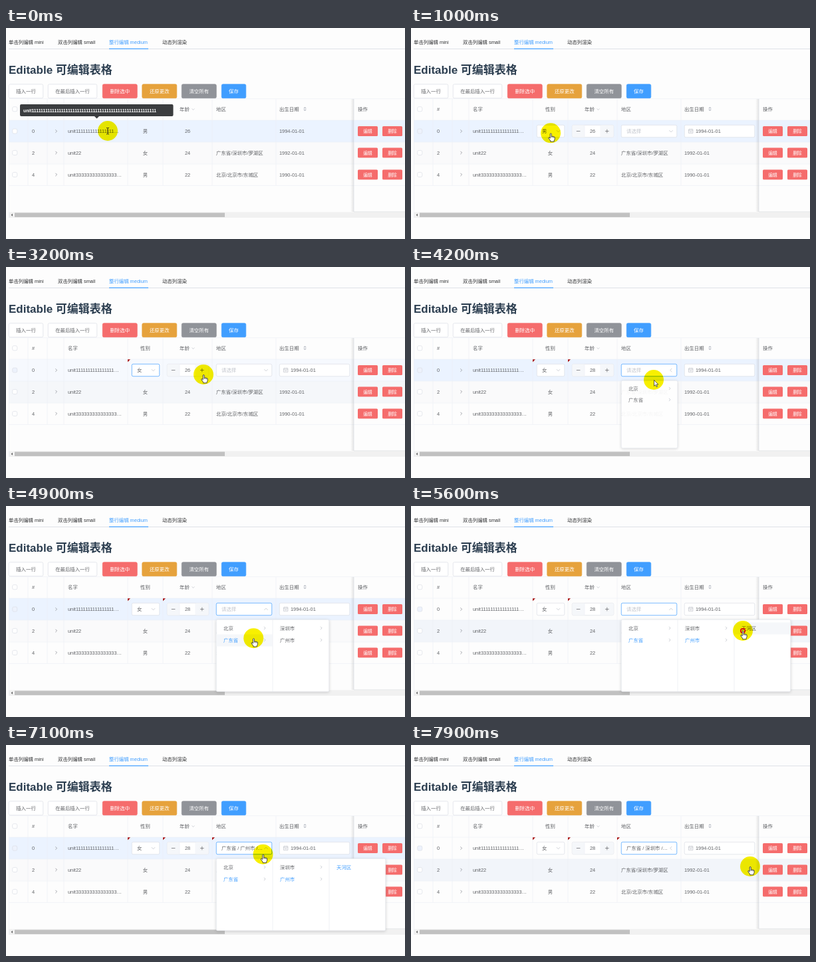
Animation of 600x318 px, one loop 8 s. Source, as an HTML page:

```html
<!DOCTYPE html>
<html lang="zh">
<head>
<meta charset="utf-8">
<title>Editable table</title>
<style>
html, body { margin: 0; width: 100%; height: 100%; overflow: hidden; background: #fdfdfd; }
svg { display: block; width: 600px; height: 318px; font: 7.4px "Liberation Sans", "Noto Sans CJK SC", "Noto Sans CJK", sans-serif; }
text { white-space: pre; }
.panel { filter: drop-shadow(0 1px 2px rgba(0, 0, 0, .16)); }
.spot { mix-blend-mode: multiply; }
</style>
</head>
<body>
<svg viewBox="0 0 600 318">
  <defs>
    <linearGradient id="edge"><stop stop-opacity="0"/><stop offset="1" stop-opacity=".1"/></linearGradient>
  </defs>
  <g id="page"></g><g id="live"></g>
</svg>
<script>
const LOOP = 8000, STEP = 100;
const BLUE = '#409eff', RED = '#f56c6c', INK = '#606266', DARK = '#303133',
      LINE = '#ebeef5', BORDER = '#dcdfe6', MUTED = '#c0c4cc', PAPER = '#fdfdfd';
const rowTops = [139, 172, 205, 237.5];
const rowMid = [155.5, 188, 221];
const longName = n => 'unit' + '1'.repeat(n);

// time, x, y, pointer shape
const pointerPath = [
  [0, 153, 155, 'beam'], [100, 168, 156, 'arrow'], [300, 208, 157, 'arrow'],
  [500, 208, 157, 'hand'], [1300, 211, 159, 'hand'], [1700, 211, 159, 'hand'],
  [2000, 215, 174, 'hand'], [2200, 213, 190, 'hand'], [2500, 212, 198, 'hand'],
  [2800, 214, 198, 'arrow'], [3200, 297, 162, 'hand'], [3700, 295, 158, 'hand'],
  [4000, 360, 160, 'hand'], [4200, 365, 170, 'arrow'], [4600, 350, 198, 'hand'],
  [4800, 352, 199, 'hand'], [5100, 430, 200, 'hand'], [5300, 432, 199, 'hand'],
  [5500, 499, 188, 'hand'], [5800, 499, 188, 'arrow'], [6300, 453, 160, 'beam'],
  [6500, 453, 160, 'beam'], [6800, 372, 157, 'hand'], [7000, 372, 158, 'hand'],
  [7300, 428, 184, 'hand'], [7400, 430, 184, 'hand'], [7700, 508, 184, 'hand'],
  [7900, 510, 183, 'hand']
];
const clicks = [500, 1400, 2500, 3400, 3700, 4000, 4700, 5100, 5600, 6800, 7300, 7700];
const rowHover = [[-1000, 0], [2700, 1], [3100, 0], [5100, 1], [5900, 0], [7600, 1]];

const clamp = v => Math.max(0, Math.min(1, v));
const rect = (x, y, w, h, fill, extra = '') =>
  `<rect x="${x}" y="${y}" width="${w}" height="${h}" fill="${fill}" ${extra}/>`;
const box = (x, y, w, h, stroke = BORDER, fill = '#fff') =>
  rect(x + .25, y + .25, w - .5, h - .5, fill, `rx="2" stroke="${stroke}" stroke-width=".7"`);
const text = (x, mid, str, fill = INK, extra = '') =>
  `<text x="${x}" y="${mid + 2.7}" fill="${fill}" ${extra}>${str}</text>`;
const centered = (x, mid, str, fill, extra = '') => text(x, mid, str, fill, 'text-anchor="middle" ' + extra);
const path = (d, stroke, width = .7, fill = 'none', extra = '') =>
  `<path d="${d}" stroke="${stroke}" stroke-width="${width}" fill="${fill}" ${extra}/>`;
const chevron = (x, y, turn = 0, size = 2.6, color = MUTED) =>
  path(`M${-size} ${-size / 2}L0 ${size / 2}L${size} ${-size / 2}`, color, .8, 'none',
    `transform="translate(${x} ${y}) rotate(${turn})"`);
const vLine = (x, y1, y2) => rect(x - .3, y1, .6, y2 - y1, LINE);
const hLine = y => rect(4, y - .3, 596, .6, LINE);

function mix(a, b, k) {
  return `rgb(${a.map((v, i) => Math.round(v + (b[i] - v) * k))})`;
}

function button(x, w, label, fill) {
  return box(x, 84.5, w, 21.5, fill || BORDER, fill || '#fff') +
    centered(x + w / 2, 95.5, label, fill ? '#fff' : INK);
}

function drawPage() {
  const tabs = [[4, '单击列编辑 mini'], [78, '双击列编辑 small'], [155, '整行编辑 medium'], [235, '动态列渲染']];
  const heads = [[39, '#'], [93, '名字'], [202, '性别'], [261, '年龄'], [316, '地区'], [411, '出生日期'], [529, '操作']];
  return rect(0, 0, 600, 318, PAPER) +
    tabs.map(([x, s], i) => text(x, 21.5, s, i === 2 ? BLUE : DARK)).join('') +
    rect(4, 31, 596, 1, '#dfe2e8') + rect(155, 30.8, 59, 1.2, BLUE) +
    `<text x="4" y="69" font-size="17" font-weight="700" fill="#2c3e50">Editable 可编辑表格</text>` +
    button(4, 52, '插入一行') + button(63, 74, '在最后插入一行') +
    button(145, 52.5, '删除选中', RED) + button(204.5, 52.5, '还原更改', '#e6a23c') +
    button(264, 52.5, '清空所有', '#909399') + button(324, 37, '保存', BLUE) +
    heads.map(([x, s]) => text(x, 122, s)).join('') +
    chevron(281.5, 122.5, 0, 1.9) +
    path('M447 121.3l2.5-2.6 2.5 2.6zM447 122.7l2.5 2.6 2.5-2.6z', 'none', 0, MUTED) +
    box(9.5, 118.5, 7.5, 7.5) +
    rect(4, 277.5, 596, 8.5, '#f1f1f1') + rect(13, 278.5, 316, 6.5, '#c1c1c1') +
    path('M10 279.7v4l-2.4-2z', 'none', 0, '#666');
}

function pointerAt(t) {
  let i = 0;
  while (i < pointerPath.length - 1 && pointerPath[i + 1][0] <= t) i++;
  const a = pointerPath[i], b = pointerPath[i + 1] || a;
  const k = clamp((t - a[0]) / (b[0] - a[0] || 1)), e = k * k * (3 - 2 * k);
  return { x: a[1] + (b[1] - a[1]) * e, y: a[2] + (b[2] - a[2]) * e, shape: a[3] };
}

function hoverWeight(row, t) {
  const i = rowHover.findLastIndex(h => h[0] <= t);
  const k = clamp((t - rowHover[i][0]) / 250);
  if (rowHover[i][1] === row) return k;
  return i && rowHover[i - 1][1] === row ? 1 - k : 0;
}

// Opening and closing of a popup: panel visibility and arrow angle
function popup(t, open, close) {
  const k = clamp((t - open) / 300);
  return {
    show: t >= close ? 1 - clamp((t - close) / 150) : 1 - (1 - k) ** 4,
    turn: 180 * (t >= close ? 1 - clamp((t - close) / 300) : k)
  };
}

function grow(state, top, content) {
  if (!state.show) return '';
  return `<g class="panel" opacity="${state.show}" transform="translate(0 ${top * (1 - state.show)}) scale(1 ${state.show})">${content}</g>`;
}

function drawRows(t) {
  const base = [[253, 253, 253], [250, 250, 251], [253, 253, 253]];
  const over = [[235, 243, 255], [242, 245, 250], [245, 247, 250]];
  const cells = [
    ['0', longName(16) + '…', '男', '26', '', '1994-01-01'],
    ['2', 'unit22', '女', '24', '广东省/深圳市/罗湖区', '1992-01-01'],
    ['4', 'unit' + '3'.repeat(15) + '…', '男', '22', '北京/北京市/东城区', '1990-01-01']
  ];
  const editing = t >= 500;
  let out = '';
  cells.forEach(([id, name, sex, age, area, date], i) => {
    const y = rowMid[i], top = rowTops[i];
    out += rect(4, top, 596, rowTops[i + 1] - top, mix(base[i], over[i], hoverWeight(i, t)));
    out += box(9.5, y - 3.7, 7.5, 7.5, BORDER, i || !editing ? '#fff' : '#edf2fc');
    out += text(39, y, id) + chevron(75.5, y, -90, 2.2, '#8c8f96') + text(93, y, name);
    if (i || !editing) {
      out += centered(209.5, y, sex) + centered(273, y, age) + text(316, y, area) + text(411, y, date);
    }
    for (const [x, label] of [[529, '编辑'], [566, '删除']])
      out += rect(x, y - 7.5, 30, 15, RED, 'rx="1.6"') + centered(x + 15, y - .2, label, '#fff', 'font-size="6.8" font-weight="500"');
  });
  return out + [106.8, ...rowTops].map(hLine).join('') +
    [4.3, 33, 62, 87, 183, 236, 310, 406].map(x => vLine(x, 107, x < 5 ? 286 : 237)).join('') +
    rect(518, 107, 5, 170, 'url(#edge)') + rect(522.7, 107, .7, 170, '#dfe2e8') +
    rect(523, 276.5, 77, 1, '#e2e3e6');
}

function drawEditors(t, p, sexList, areaList) {
  if (t < 500) return '';
  const y = rowMid[0], top = 146, h = 19;
  const age = 26 + (t >= 3400) + (t >= 3700);
  const area = t >= 7700 ? '广东省 / 深圳市 /…' : t >= 5700 ? '广东省 / 广州市 /…' : '';
  const overDate = p.x > 411 && p.x < 517 && p.y > top && p.y < top + h;
  const marks = [[183, 2600], [236, 3400], [310, 5700]].filter(m => t >= m[1]);
  return box(189, top, 42, h, t >= 1400 && t < 4100 ? BLUE : BORDER) +
    text(197, y, t >= 2600 ? '女' : '男') + chevron(221.5, y, sexList.turn) +
    box(242, top, 63, h) + rect(242.5, 146.5, 18.5, 18, '#f5f7fa') + rect(285.5, 146.5, 19, 18, '#f5f7fa') +
    vLine(261, 146.5, 164.5) + vLine(285, 146.5, 164.5) +
    path('M248.8 155.5h5.6M292 155.5h5.6M294.8 152.7v5.6', INK) + centered(273, y, age) +
    box(316, top, 84, h, t >= 4100 ? BLUE : BORDER) +
    text(324, y, area || '请选择', area ? INK : MUTED) + chevron(391, y, areaList.turn) +
    box(411, top, 106, h) +
    path('M417.5 152.8h6.4v5.6h-6.4zM417.5 154.7h6.4M419.2 151.8v1.6M422.2 151.8v1.6M419 156.5h3.4', '#b4b8c0', .6) +
    text(428, y, '1994-01-01') +
    (overDate ? `<circle cx="507.5" cy="155.3" r="3.2" fill="#a9adb5"/>` + path('M506.4 154.2l2.2 2.2m0-2.2l-2.2 2.2', '#fff', .6) : '') +
    marks.map(([x]) => path(`M${x} 139.3h4l-4 4z`, 'none', 0, '#a80f0f')).join('');
}

function drawSexList(state, p) {
  const items = ['男', '女'].map((s, i) => {
    const y = 174 + 18 * i, hot = p.y > 172 + 18 * i && p.y < 190 + 18 * i;
    return (hot ? rect(189.5, y, 41, 18, '#f5f7fa') : '') + text(200, y + 9, s, i ? INK : BLUE, i ? '' : 'font-weight="700"');
  });
  return grow(state, 167, box(189, 167, 41.5, 47, '#e4e7ed') + items.join(''));
}

function drawAreaList(t, state, p) {
  const again = t >= 6700;
  const city = again ? (t >= 7300 ? '深圳市' : '广州市') : t >= 5100 ? '广州市' : '';
  const columns = [['北京', '广东省']];
  if (again || t >= 4700) columns.push(['深圳市', '广州市']);
  if (city) columns.push([city === '深圳市' ? '罗湖区' : '天河区']);
  const chosen = [again || t >= 4700 ? '广东省' : '', city, again && t < 7300 || t >= 7700 ? columns[2][0] : ''];
  let out = box(316, 171, 85 * columns.length, 109, '#e4e7ed');
  columns.forEach((items, c) => {
    const x = 316 + 85 * c;
    if (c) out += rect(x - .3, 171, .6, 109, '#e4e7ed');
    items.forEach((name, i) => {
      const y = 175.5 + 18 * i;
      const hot = p.x > x && p.x < x + 85 && p.y > y && p.y < y + 18;
      const color = chosen[c] === name ? BLUE : INK;
      if (hot) out += rect(x + .4, y, 84.2, 18, '#f5f7fa');
      out += text(x + 11, y + 8.7, name, color) + (c < 2 ? chevron(x + 73, y + 8.5, -90, 2.2) : '');
    });
  });
  return grow(state, 170, out);
}

function drawTooltip(t) {
  const alpha = 1 - clamp(t / 300);
  return alpha ? `<g opacity="${alpha}">` + rect(21, 115, 230.5, 18, '#3b3d3f', 'rx="2"') +
    path('M133 133h7l-3.5 3.5z', 'none', 0, '#3b3d3f') +
    text(26, 124, longName(55), '#fff', 'font-size="6.8" font-weight="700"') + '</g>' : '';
}

function drawPointer(t, { x, y, shape }) {
  const shapes = {
    beam: path('M-2 -4.5h1.4l.6 .6 .6-.6H2M0 -4v8.5M-2 5h1.4L0 4.4l.6 .6H2', '#222', .9),
    arrow: path('M.5 .5v9l2.1-2 1.5 3.3 1.4-.6-1.5-3.2h2.9z', '#222', .7, '#fff'),
    hand: path('M-.8 1q1-1.2 2 0v4.2l1.6-.3 1.7 .4 1.6 .8v3.3l-1 2v1.4H-.3v-1.2l-2.8-3.8q-.5-1.5 1-1.2l1.3 1.2z', '#222', .8, '#fff') +
      path('M1.2 5v2M3 5.3v1.8M4.6 5.8v1.5', '#222', .6)
  };
  const pressed = clicks.some(c => t >= c && t - c < 200);
  return `<circle class="spot" cx="${x}" cy="${y}" r="15" fill="#f8f000"/>` +
    (pressed ? `<circle cx="${x}" cy="${y}" r="3.2" fill="none" stroke="#e01010" stroke-width="1.8"/>` : '') +
    `<g transform="translate(${x} ${y})">${shapes[shape]}</g>`;
}

function drawLive(t) {
  const p = pointerAt(t);
  const sexList = popup(t, 1450, 2550);
  const areaList = t < 6700 ? popup(t, 4050, 5650) : popup(t, 6800, 7750);
  return drawRows(t) + drawEditors(t, p, sexList, areaList) + drawTooltip(t) +
    drawSexList(sexList, p) + drawAreaList(t, areaList, p) + drawPointer(t, p);
}

const live = document.getElementById('live');
document.getElementById('page').innerHTML = drawPage();
const start = performance.now();
let shown = -1;
function tick() {
  const t = Math.floor((performance.now() - start) % LOOP / STEP) * STEP;
  if (t !== shown) live.innerHTML = drawLive(shown = t);
  requestAnimationFrame(tick);
}
tick();
</script>
</body>
</html>
```
